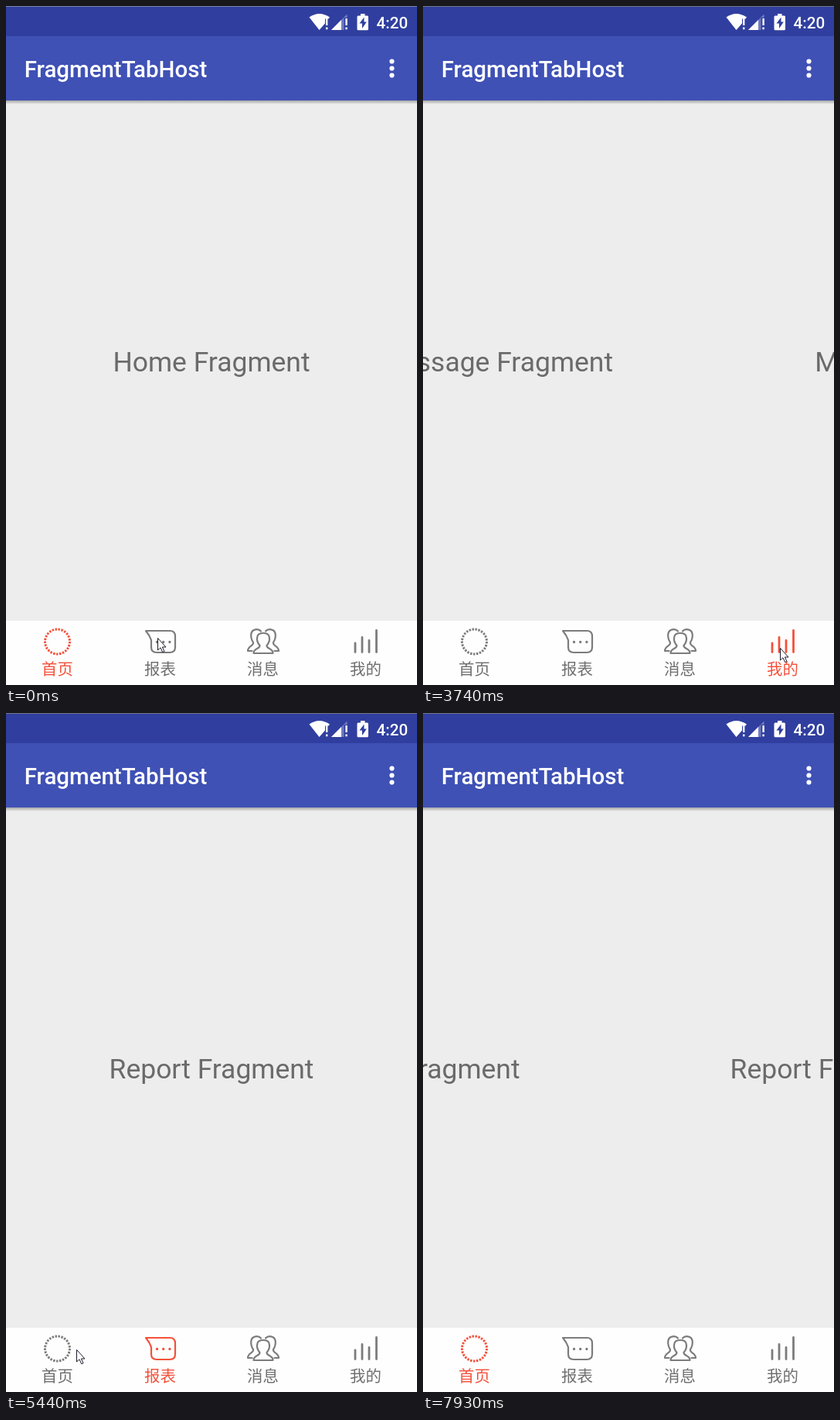
An HTML page for the animation above (7990 ms loop, 532 px wide and 877 px high).

```html
<!DOCTYPE html>
<html lang="zh">
<head>
<meta charset="utf-8">
<title>FragmentTabHost</title>
<style>
  html, body { margin: 0; width: 100%; height: 100%; overflow: hidden; background: #ededed; }
  svg { display: block; width: 532px; height: 877px; }
  text { font-family: Roboto, "Noto Sans", sans-serif; }
  .page { font-size: 35.47px; fill: #6a6a6a; text-anchor: middle; }
  .tab { color: #6e6e6e; fill: none; stroke: #7c7c7c; stroke-width: 2.2; stroke-linecap: round; stroke-linejoin: round; }
  .tab.on { color: #f4513b; stroke: #f4513b; }
  .label { font: 20.4px "Noto Sans CJK SC", "Noto Sans CJK JP", "Noto Sans CJK", sans-serif; fill: currentColor; stroke: none; text-anchor: middle; }
</style>
</head>
<body>
<svg viewBox="0 0 532 877">
  <defs>
    <linearGradient id="shade" x2="0" y2="1">
      <stop stop-color="#000" stop-opacity=".3"/>
      <stop offset="1" stop-color="#000" stop-opacity="0"/>
    </linearGradient>
  </defs>
  <rect width="532" height="877" fill="#ededed"/>
  <g id="pages"></g>

  <rect y="122" width="532" height="5" fill="url(#shade)"/>
  <rect y="39" width="532" height="83" fill="#3f51b5"/>
  <rect width="532" height="39" fill="#303f9f"/>
  <rect id="edge" width="532" height="1"/>

  <g fill="#fff">
    <path d="M392.500 14.500Q405.500 5.500 419 14.500L417.500 16.500H413V22.500L405.500 31Z"/>
    <path id="alert" d="M414 16h2.400v9h-2.400zM414 27.500h2.400v2.700h-2.400z"/>
    <use href="#alert" x="25.400"/>
    <path d="M421 31L441.500 10.500V15H437.500V31Z" opacity=".32"/>
    <path d="M421 31L434 18V31Z"/>
    <path d="M459 10h5.500v2.500h3q1.500 0 1.500 1.500v15.700q0 1.500-1.500 1.500h-11.500q-1.500 0-1.500-1.500V14q0-1.500 1.500-1.500h3z"/>
    <path d="M463.500 14.500l-6 8h3.500v6.500l5.800-8.500h-3.300z" fill="#303f9f"/>
    <text x="479.500" y="28.500" font-size="20.700" font-weight="500">4:20</text>
    <text x="23.700" y="91.700" font-size="29.450" font-weight="500">FragmentTabHost</text>
    <path d="M499.500 71.500v18.100" stroke="#fff" stroke-width="6.200" stroke-linecap="round" stroke-dasharray="0 9"/>
  </g>

  <rect y="794" width="532" height="83" fill="#fefefe"/>
  <g class="tab">
    <circle cx="66.500" cy="821" r="16" pathLength="25" stroke-width="3" stroke-linecap="butt" stroke-dasharray=".62 .38"/>
  </g>
  <g class="tab">
    <path d="M181 807H212Q219 807 219 814V828Q219 835 212 835H195Q188 835 188 828V819Q186 813 181 807Z"/>
    <path d="M195.500 821.500h16.500" stroke-width="3.400" stroke-dasharray="0 8.200"/>
  </g>
  <g class="tab" stroke-width="2">
    <path d="M328.500 826C325 822 324.500 818 325.300 814.500C326.500 808.500 339.500 808.500 340.700 814.500C341.500 818 341 822 337.500 826C337.500 831 345.500 829 345.500 836H320.500C320.500 829 328.500 831 328.500 826Z"/>
    <path id="friend" d="M330 807.500C327 804 318.500 804 317.300 811C316.700 816 318 819 320 822C321 827 313 826 313 833H318.500"/>
    <use href="#friend" transform="matrix(-1 0 0 1 666 0)"/>
  </g>
  <g class="tab">
    <path d="M452 823V834.500M461 815.500V834.500M470 819.500V834.500M479.500 806.500V834.500" style="stroke-width:2.800"/>
  </g>

  <path id="cursor" d="M.5 .5V16L4 12.800L6.700 18.700L9 17.700L6.400 12H11Z" fill="#fff" stroke="#1b1b2b"/>
</svg>
<script>
const LOOP = 7990, STEP = 10, WIDTH = 532, TRAVEL = 590;
const names = ['Home', 'Report', 'Message', 'Mine'];
const labels = ['首页', '报表', '消息', '我的'];

// Each visit: the pointer arrives at (x, y), then taps a tab.
const visits = [
  { arrive: 0, x: 196, y: 816, tap: 745, tab: 1 },
  { arrive: 1820, x: 341, y: 822, tap: 2335, tab: 2 },
  { arrive: 3030, x: 462, y: 829, tap: 3725, tab: 3 },
  { arrive: 4510, x: 222, y: 829, tap: 4825, tab: 1 },
  { arrive: 5560, x: 61, y: 820, tap: 6306, tab: 0 }
];
// The closing swipe: the page trails behind the pointer.
const swipe = { arrive: 7070, x: 393, y: 507, start: 7400, exit: 7860, end: 7930, amount: 0.504 };

const $ = id => document.getElementById(id);
const clamp = v => Math.min(1, Math.max(0, v));
const mix = (a, b, k) => a + (b - a) * k;
const progress = (t, from, to) => clamp((t - from) / (to - from));
const smooth = k => k * k * (3 - 2 * k);
const decelerate = k => 1 - (1 - k) ** 5;

function addText(parent, className, x, y, content) {
  const el = document.createElementNS('http://www.w3.org/2000/svg', 'text');
  el.setAttribute('class', className);
  el.setAttribute('x', x);
  el.setAttribute('y', y);
  el.textContent = content;
  return parent.appendChild(el);
}

const tabs = document.querySelectorAll('.tab');
const pages = names.map(name => addText($('pages'), 'page', 266, 472, name + ' Fragment'));
labels.forEach((label, i) => addText(tabs[i], 'label', (i + 0.5) * WIDTH / 4, 864, label));

// Crossing more pages takes longer.
visits.forEach((visit, i) => {
  visit.from = i ? visits[i - 1].tab : 0;
  visit.settled = visit.tap + 100 * (Math.abs(visit.tab - visit.from) + 1);
});

function pagerAt(t) {
  const last = visits.filter(v => v.tap <= t).pop();
  const dragged = swipe.amount * progress(t, swipe.start + 30, swipe.end);
  if (!last) return { tab: 0, position: 0 };
  const k = decelerate(progress(t, last.tap, last.settled));
  return { tab: last.tab, position: mix(last.from, last.tab, k) + dragged };
}

function pointerAt(t) {
  let { x, y } = visits[0];
  [...visits.slice(1), swipe].forEach((stop, i) => {
    const leave = Math.max(stop.arrive - TRAVEL, visits[i].settled);
    const k = smooth(progress(t, leave, stop.arrive));
    x = mix(x, stop.x, k);
    y = mix(y, stop.y, k);
  });
  x = mix(x, -14, progress(t, swipe.start, swipe.exit));
  return [x, y].map(Math.round);
}

function draw(time) {
  const t = Math.floor(time % LOOP / STEP) * STEP;
  const { tab, position } = pagerAt(t);
  pages.forEach((el, i) => el.setAttribute('x', 266 + Math.round((i - position) * WIDTH)));
  tabs.forEach((el, i) => el.classList.toggle('on', i === tab));
  $('cursor').setAttribute('transform', `translate(${pointerAt(t)})`);
  $('edge').setAttribute('fill', t < 460 ? '#7d84a8' : '#70767f');
}

const begin = performance.now();
function tick() {
  draw(performance.now() - begin);
  requestAnimationFrame(tick);
}
tick();
</script>
</body>
</html>
```
